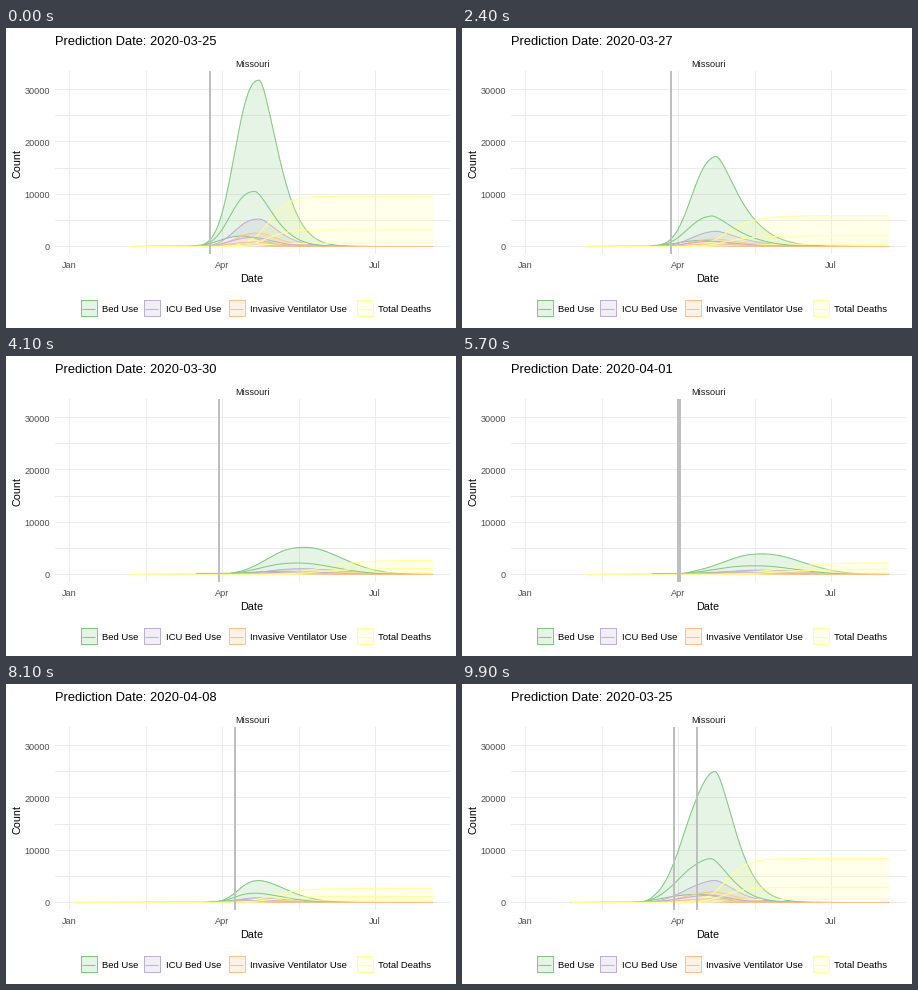
These frames come from a looping animation (450 px wide and 300 px high, 10000 ms). A matplotlib script:

```python
import math

import numpy as np
import matplotlib.pyplot as plt
from matplotlib.animation import FuncAnimation
from matplotlib.patches import Polygon, Rectangle

W, H, DPI = 450, 300, 100
PX = 72 / DPI                      # one pixel in points
FRAMES, STEP_MS, STEPS = 100, 100, 4
LEFT, RIGHT, TOP, BOTTOM = 49, 444, 43, 226
ZERO_Y, PX_PER_COUNT = 218.5, 0.00523
PX_PER_DAY = 1.684
FIRST_X, LAST_X, EARLY_SHIFT = 124, 426.5, 57
MAX_BEDS = 32000

NAMES = ["Bed Use", "ICU Bed Use", "Invasive Ventilator Use", "Total Deaths"]
COLORS = ["#7FC97F", "#BEAED4", "#FDC086", "#FFFF99"]

# Days after March 25 of each prediction, and the frame its successor moves in
DAYS = [0, 1, 2, 4, 5, 6, 7, 11, 13, 14, 16, 18]
STARTS = [5 + 9 * i - max(0, i - 4) for i in range(len(DAYS))]


def bump(x, peak, center, rise, fall, onset):
    """Steep rise and slower fall around the center."""
    d = x - center
    y = peak * np.where(d < 0, np.exp(-np.abs(d / rise) ** 2.5),
                        np.exp(-np.abs(d / fall) ** (1 + fall / 52)))
    seed = min(200, 0.15 * peak)
    return np.where((x > onset) & (d < 0), np.maximum(y, seed), y)


def forecast(beds, center, rise, fall, deaths, onset=190, early=False):
    """x positions and y of upper, mean and lower for the four measures."""
    x = BASE_X - WARP if early else BASE_X
    mean = 0.44 - 0.11 * beds / MAX_BEDS
    bounds = [(1, 0), (mean, 0.14), (mean ** 2.5, 0.5)]
    critical = mean / 2
    measures = [[bump(x, beds * use * part, center - lead * rise, rise, fall, onset)
                 for part, lead in bounds]
                for use in (1, critical, critical ** 1.4)]
    mid, spread = center + 0.36 * fall, 0.36 * fall
    measures.append([deaths * part / (1 + np.exp((mid - 8 * lead - x) / spread))
                     for part, lead in bounds])
    return x, ZERO_Y - PX_PER_COUNT * np.array(measures)


def flattened(i):
    lag = 0.2 ** i
    return forecast(5200, 302 - 18 * lag, 50 - 14 * lag, 54 - 16 * lag,
                    2800 - 600 * lag)


def rebound(i):
    return forecast(4100 + 400 * i, 252 + 4 * i, 26, 39, 2500 + 600 * i ** 2,
                    onset=203, early=True)


# Series that begin earlier slide sideways, but only up to the steep rise
BASE_X = np.linspace(FIRST_X, LAST_X, 181)
WARP = EARLY_SHIFT * np.clip((246 - BASE_X) / 40, 0, 1)

SHAPES = ([forecast(31800, 253.5, 31, 27, 9600)] * 3
          + [flattened(i) for i in range(4)]
          + [forecast(1250, 240, 16, 36, 520, onset=203)] * 2
          + [rebound(i) for i in range(3)])

plt.rcParams["font.family"] = "Liberation Sans"
fig = plt.figure(figsize=(W / DPI, H / DPI), dpi=DPI, facecolor="white")
ax = fig.add_axes([0, 0, 1, 1])
ax.set_xlim(0, W)
ax.set_ylim(H, 0)
ax.axis("off")


def text(x, y, s, size, color="black", ha="center", va="baseline", **kw):
    return ax.text(x, y, s, fontsize=size * PX, color=color, ha=ha, va=va, **kw)


def line(x, y, color, z):
    return ax.plot(x, y, color=color, lw=PX, solid_capstyle="butt", zorder=z)[0]


def block(x, y, w, h, z, **kw):
    return ax.add_patch(Rectangle((x, y), w, h, antialiased=False, zorder=z, **kw))


# Grid and axis labels
for i in range(5):
    block(int(63.5 + 76.5 * i), TOP, 1, BOTTOM - TOP, 1, fc="#EBEBEB", lw=0)
for i in range(7):
    gy = int(ZERO_Y - PX_PER_COUNT * 5000 * i)
    block(LEFT, gy, RIGHT - LEFT, 1, 1, fc="#EBEBEB", lw=0)
for count in range(0, 40000, 10000):
    text(44, ZERO_Y - PX_PER_COUNT * count + 4, str(count), 9.2, "#4D4D4D", "right")
for i, month in enumerate(("Jan", "Apr", "Jul")):
    text(63 + 153 * i, 240, month, 9.2, "#4D4D4D")
text(246, 254, "Date", 10.8)
text(11.5, 135.5, "Count", 10.8, va="center", rotation=90)
text(246, 39, "Missouri", 9.1, "#1A1A1A")
title = text(49, 17, "", 12.86, ha="left")

# Legend
for kx, name, color in zip((74, 137, 222, 350), NAMES, COLORS):
    block(kx + 0.5, 271.5, 16, 16, 2, fc=color, alpha=0.2, lw=0)
    block(kx + 0.5, 271.5, 16, 16, 3, fc="none", ec=color, lw=PX)
    line([kx + 2, kx + 15], [280.5, 280.5], color, 3)
    text(kx + 22.5, 284.5, name, 9.5, ha="left")

# Moving parts
bands, edges, means = [], [], []
for i, color in enumerate(COLORS):
    band = Polygon(np.zeros((3, 2)), fc=color, alpha=0.2, lw=0,
                   antialiased=False, zorder=2 + 0.1 * i)
    bands.append(ax.add_patch(band))
    edges.append([line([], [], color, 2.05 + 0.1 * i) for _ in range(2)])
    means.append(line([], [], color, 3 + 0.1 * i))
markers = [block(0, TOP, 2, BOTTOM - TOP, 4, fc="#BEBEBE", lw=0) for _ in range(2)]


def marker_x(day):
    return math.floor(203.82 + PX_PER_DAY * day)


def date_label(day):
    month, d = (3, 25 + day) if day < 7 else (4, day - 6)
    return f"Prediction Date: 2020-{month:02d}-{d:02d}"


def draw(n):
    k = max((i for i, s in enumerate(STARTS) if s <= n), default=len(STARTS) - 1)
    nxt = (k + 1) % len(DAYS)
    t = min((n - STARTS[k]) % FRAMES + 1, STEPS) / STEPS

    (xa, ya), (xb, yb) = SHAPES[k], SHAPES[nxt]
    x = xa + (xb - xa) * t
    y = ya + (yb - ya) * t
    for i, (upper, mean, lower) in enumerate(y):
        bands[i].set_xy(np.column_stack([np.r_[x, x[::-1]],
                                         np.r_[upper, lower[::-1]]]))
        edges[i][0].set_data(x, upper)
        edges[i][1].set_data(x, lower)
        means[i].set_data(x, mean)

    # On long jumps the old marker stays until the new one arrives
    jump = DAYS[nxt] - DAYS[k]
    markers[0].set_x(marker_x(DAYS[k] + jump * t))
    markers[1].set_x(marker_x(DAYS[k]))
    markers[1].set_visible(abs(jump) > 3 and t < 1)
    title.set_text(date_label(DAYS[nxt if t > 0.5 else k]))
    return []


anim = FuncAnimation(fig, draw, frames=FRAMES, interval=STEP_MS,
                     init_func=lambda: draw(0), repeat=True, repeat_delay=0)
plt.show()
```
